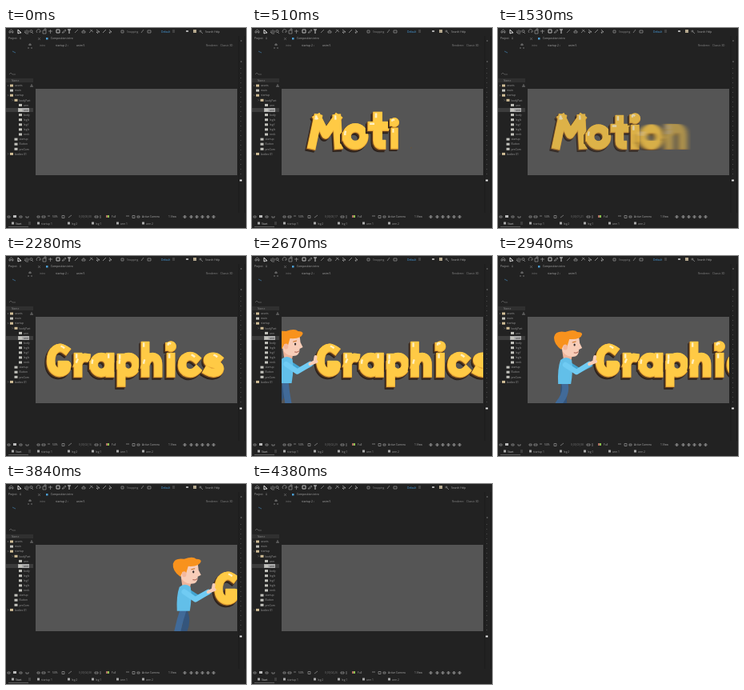
An HTML page for the animation above (4.44 s loop, 300 by 250 pixels).

```html
<!DOCTYPE html>
<html lang="en">
<head>
<meta charset="utf-8">
<title>Motion Graphics</title>
<style>
html, body { margin: 0; width: 100%; height: 100%; overflow: hidden; background: #222; }
svg { display: block; width: 300px; height: 250px; font: 3.3px "Open Sans", sans-serif; }
.letter path { fill: none; stroke-linecap: square; stroke-linejoin: round; }
.limb { fill: none; stroke-linecap: round; stroke-linejoin: round; }
</style>
</head>
<body>
<svg viewBox="0 0 300 250">
  <defs>
    <clipPath id="view"><rect x="37" y="76" width="252" height="108"/></clipPath>
    <filter id="smear" x="-50%" width="200%"><feGaussianBlur stdDeviation="3 0"/></filter>
  </defs>
  <rect width="300" height="250" fill="#222"/>
  <g id="ui"></g>
  <rect x="37" y="76" width="252" height="108" fill="#555"/>
  <g clip-path="url(#view)">
    <g id="motion" role="img" aria-label="Motion"></g>
    <g id="graphics" role="img" aria-label="Graphics"></g>
    <g id="man">
      <path id="legBack" class="limb" stroke="#34557c" stroke-width="8"/>
      <path id="legFront" class="limb" stroke="#416a98" stroke-width="8"/>
      <g id="torso">
        <path class="limb" d="M87 134L101 143 115 136" stroke="#43a5d2" stroke-width="6"/>
        <path d="M80 118H94L91 132 82 131Z" fill="#eeb49b"/>
        <path d="M78 130Q85 124 92 130 94 143 91 160H75Q74 141 78 130Z" fill="#62bfe9"/>
        <path d="M79 101H101L102 109 105 115 101 117Q101 126 93 126 82 126 79 115Z" fill="#f8cdb8"/>
        <path d="M79 117Q69 110 70 101 72 93 84 95 95 91 99 95 105 95 105 98 103 105 89 104L86 114 82 111Z" fill="#f8921d"/>
        <ellipse cx="84" cy="114" rx="2.7" ry="3.5" fill="#f3b79d"/>
        <ellipse cx="95.5" cy="111" rx="1.1" ry="1.6" fill="#332a2a"/>
        <path class="limb" d="M93 108l4-1" stroke="#c96d19" stroke-width="1"/>
        <path class="limb" d="M95 121q3 1 5-1" stroke="#a55849" stroke-width="1"/>
      </g>
      <path id="arm" class="limb" stroke="#70cbf3" stroke-width="6.5"/>
      <path class="limb" d="M114 135L120 132 121 126M117 134l5-2" stroke="#f8cdb8" stroke-width="4"/>
    </g>
  </g>
</svg>
<script>
const NS = 'http://www.w3.org/2000/svg';
const $ = id => document.getElementById(id);
const ui = $('ui');
const clamp = x => Math.max(0, Math.min(1, x));
const smooth = x => x * x * (3 - 2 * x);
const backOut = x => 1 + 2.7 * (x - 1) ** 3 + 1.7 * (x - 1) ** 2;

function add(parent, tag, attrs, text) {
  const el = document.createElementNS(NS, tag);
  for (const key in attrs) el.setAttribute(key, attrs[key]);
  if (text) el.textContent = text;
  parent.append(el);
  return el;
}
const rect = (x, y, width, height, fill) => add(ui, 'rect', {x, y, width, height, fill});
const label = (x, y, text, fill = '#999') => add(ui, 'text', {x, y, fill}, text);
const line = (d, stroke = '#aaa', w = .6) =>
  add(ui, 'path', {d, stroke, 'stroke-width': w, fill: 'none'});

// Toolbar
line('M4 6V4L6.5 2 9 4V6H7.5V4.5H5.5V6Z');
line('M15 2L19 6H17L15 7Z', '#e0e0e0', 1);
line('M24 6V3M26 6V2M28 6V3M23 5L25 7H28');
line('M32 5L34 7M33 4A1.5 1.5 0 1 1 30 4A1.5 1.5 0 1 1 33 4');
line('M39 6A2.5 2.5 0 1 1 43 5M43 5H41');
line('M46 3H50V7H46ZM48 3V1H50V3');
line('M53 4H58M55.5 2V7');
line('M63 2H67V6H63Z', '#bbb', 1);
line('M70 6L74 2 75 3 72 6Z');
line('M77 2H81M79 2V7', '#d0d0d0', 1);
line('M86 6L90 2M95 6V4H99V6ZM97 4V2M104 6L108 2M105 2L109 5');
line('M113 2L117 5H113L115 7M121 6L125 2M129 2L132 5H129L130 7', '#c8c8c8');
line('M144 3H147V6H144ZM169 6L172 2M177 3H181V6H177Z');
label(151, 5.5, 'Snapping', '#888');
label(194, 5.5, 'Default', '#4aa5e8');
line('M208 3H211M208 5H211', '#888');
rect(225, 3, 3, 2, '#aaa');
rect(234, 2, 4, 4, '#b5a88e');
line('M242 4A1 1 0 1 1 244 4A1 1 0 1 1 242 4M244 5L246 7');
label(249, 5.5, 'Search Help', '#aaa');

// Panel headings
label(3, 14, 'Project', '#aaa');
line('M17 12H19M17 13.5H19M40 12L43 15M43 12L40 15', '#888', .5);
rect(50, 12, 2.5, 2.5, '#4b9fd5');
label(56, 14, 'Composition intro', '#aaa');
label(42, 22.5, 'intro', '#777');
label(62, 22.5, 'startup 2  ‹', '#aaa');
label(88, 22.5, 'anim 5', '#aaa');
label(250, 22.5, 'Renderer:', '#888');
label(268, 22.5, 'Classic 3D', '#888');
line('M30 19V22M28 21H32M27 25H29M31 25H33', '#aaa');
line('M8 29L12 31', '#4b8fc5');
line('M4 58L6 56 8 58H12', '#777');

// Project list
rect(0, 63, 34, 5, '#303030');
label(7, 67, 'Name', '#888');
const rows = [
  [0, 'assets', 1], [0, 'main'], [0, 'startup', 1], [5.5, 'bodyPart', 1],
  [11, 'arm'], [11, 'arm'], [11, 'body'], [11, 'leg b'], [11, 'leg f'],
  [11, 'leg b'], [11, 'neck'], [5.5, 'startup'], [5.5, 'Button'], [5.5, 'preCom'],
  [0, 'bodies 01', 1]
];
rows.forEach(([indent, name, folder], i) => {
  const y = 72 + i * 6.1, x = 4 + indent, selected = i === 5;
  if (selected) {
    rect(0, y - 2.5, 34, 5, '#3c3c3c');
    rect(x, y - 2.5, 14, 5, '#aaa');
  }
  if (folder) line(`M${x - 2} ${y - 1}l1 1-1 1`, '#888', .5);
  rect(x + 1, y - 1.5, 4, 3, folder ? '#d0bd96' : '#c2c2bc');
  label(x + 7, y + 1.2, name, selected ? '#333' : '#999');
});
line('M30 73H34M32 70V73', '#aaa');

// Right edge
line('M291 10V231M298.5 10V231', '#191919');
line('M293.5 50V186', '#555', .8).setAttribute('stroke-dasharray', '1 5');
line('M293 16H295M293 42H295', '#aaa');
line('M292 190.5H295', '#ddd', 2);

// Viewer controls
line('M2 235H5V237H2ZM17 235H20V237H17ZM25 235V237H28V235M39 235H42V237H39ZM45 235H49V237H45Z');
rect(9, 234, 4, 3, '#bbb');
label(58, 237, '50%', '#aaa');
line('M52 235H55M70 234.5H73V237.5H70ZM78 237L82 234M111 235H115V237H111ZM118 234V238');
const clock = label(91, 237, '0;00;00;00', '#777');
rect(125, 234, 2, 3, '#b06b63');
rect(127, 234, 2, 3, '#8cc04d');
label(132, 237, 'Full', '#aaa');
line('M150 235H154M158 234.5H161V237.5H158ZM164 235H167V237H164Z');
label(170, 237, 'Active Camera', '#aaa');
label(203, 237, '1 View', '#aaa');
[222, 230, 237, 244, 251, 258].forEach(x => line(`M${x} 235h3v2h-3zM${x + 1.5} 234v4`));

// Timeline tabs
[[12, 'Start'], [44, 'startup 1'], [82, 'leg 2'], [112, 'leg 1'], [143, 'arm 1'], [175, 'arm 2']]
  .forEach(([x, name], i) => {
    rect(x - 5, 242.5, 3, 3, '#aaa');
    label(x, 245.5, name, i ? '#999' : '#ccc');
  });
line('M3 248.5H28', '#888');
line('M28 243H31M28 245H31', '#888', .5);

// Lettering: centre lines, with each stroke beginning at its highlight
const ring = (x, y, rx, ry) =>
  `M${x - rx} ${y}A${rx} ${ry} 0 1 1 ${x + rx} ${y}A${rx} ${ry} 0 1 1 ${x - rx} ${y}`;
const dot = x => ring(x, 113, 1.5, 1.5);
const motionShapes = [
  [91, 'M82 113L75 146M82 113L92 133 106 113M106 113L108 146'],
  [129, ring(129, 136, 10.5, 10.5)],
  [157, 'M157 114V141Q157 146 161 146M151 125H165'],
  [178, 'M178 126V146' + dot(178)],
  [199, ring(200, 136, 10.5, 10.5)],
  [232, 'M224 125V146M224 134Q227 125 234 125 241 126 241 135V146']
];
const graphicsShapes = [
  [66, 'M74 117C66 111 56 117 56 131C56 149 75 149 76 138V136H70'],
  [95, 'M90 126V146M90 135Q93 126 100 127'],
  [120, ring(119, 136, 9.5, 10) + 'M130 126V146'],
  [153, 'M144 127V158' + ring(153, 136, 9.5, 10)],
  [182, 'M174 112V146M174 136Q176 126 183 126 190 127 190 136V146'],
  [206, 'M206 126V146' + dot(206)],
  [230, 'M237 128C230 122 220 126 220 136C220 147 232 149 238 143'],
  [259, 'M265 128C260 124 252 126 252 130C252 137 267 133 267 141C266 147 257 147 252 144']
];
const layers = [
  ['#2b211c', 11.5, -2, 3], ['#5c3b1d', 11.5, -1, 1.4],
  ['#e8a534', 11, 0, .4], ['#ffca45', 10, .2, -.3]
];

function buildWord(id, shapes) {
  return shapes.map(([x, d]) => {
    const el = add($(id), 'g', {class: 'letter'});
    for (const [stroke, w, dx, dy] of layers)
      add(el, 'path', {d, stroke, 'stroke-width': w, transform: `translate(${dx} ${dy})`});
    add(el, 'path', {
      d, stroke: '#fff0c2', 'stroke-width': 2.4, 'stroke-dasharray': '3 200',
      transform: 'translate(-1.8 -2.5)'
    });
    return {el, x};
  });
}
const motion = buildWord('motion', motionShapes);
const graphics = buildWord('graphics', graphicsShapes);

function pose({el, x}, scale, dx = 0, alpha = 1, smeared = false) {
  el.style.display = scale > .01 && alpha > 0 ? '' : 'none';
  el.setAttribute('transform',
    `translate(${x + dx} 150) scale(${scale}) translate(${-x} -150)`);
  el.style.opacity = alpha;
  el.style.filter = smeared ? 'url(#smear)' : '';
}

function drawWords(t) {
  const squeeze = smooth(clamp((t - 1260) / 270));
  motion.forEach((letter, i) => {
    const enter = clamp((t - 50 - i * 115) / 420);
    const leave = clamp((t - 1490 - (5 - i) * 36) / 120);
    pose(letter, enter ? backOut(enter) : 0, -(2 + 1.6 * i) * squeeze,
      (1 - leave) * (1 - .2 * squeeze), leave > 0);
  });
  graphics.forEach((letter, i) => {
    const enter = clamp((t - 1590 - (7 - i) * 28) / 250);
    pose(letter, enter ? backOut(enter) : 0, 0, clamp(enter * 4), enter < .4);
  });
  $('graphics').setAttribute('transform', `translate(${Math.max(0, (t - 2480) * .154)})`);
}

function drawMan(t) {
  $('man').style.display = t >= 2280 && t < 4380 ? '' : 'none';
  $('man').setAttribute('transform', `translate(${(t - 2940) * .154})`);
  const phase = (t - 3420) / 640 * Math.PI * 2;
  const stride = Math.cos(phase), lift = Math.sin(phase);
  const rise = -4 * stride * stride;
  const leg = (s, l) => `M83 ${158 + rise}Q${84 + 6 * s + 3 * l} 171 ${79 + 12 * s - 3 * l} ${187 - 3 * Math.max(0, l)}`;
  $('legFront').setAttribute('d', leg(stride, lift));
  $('legBack').setAttribute('d', leg(-stride, -lift));
  $('torso').setAttribute('transform', `translate(0 ${rise})`);
  $('arm').setAttribute('d', `M84 ${136 + rise}L98 ${145 + rise / 2} 114 135`);
}

function draw(now) {
  const t = now % 4440;
  drawWords(t);
  drawMan(t);
  const frame = Math.floor(t / 30);
  const pad = n => String(n).padStart(2, '0');
  clock.textContent = `0;00;${pad(Math.floor(frame / 30))};${pad(frame % 30)}`;
}

const start = performance.now();
function tick() {
  draw(performance.now() - start);
  requestAnimationFrame(tick);
}
tick();
</script>
</body>
</html>
```
